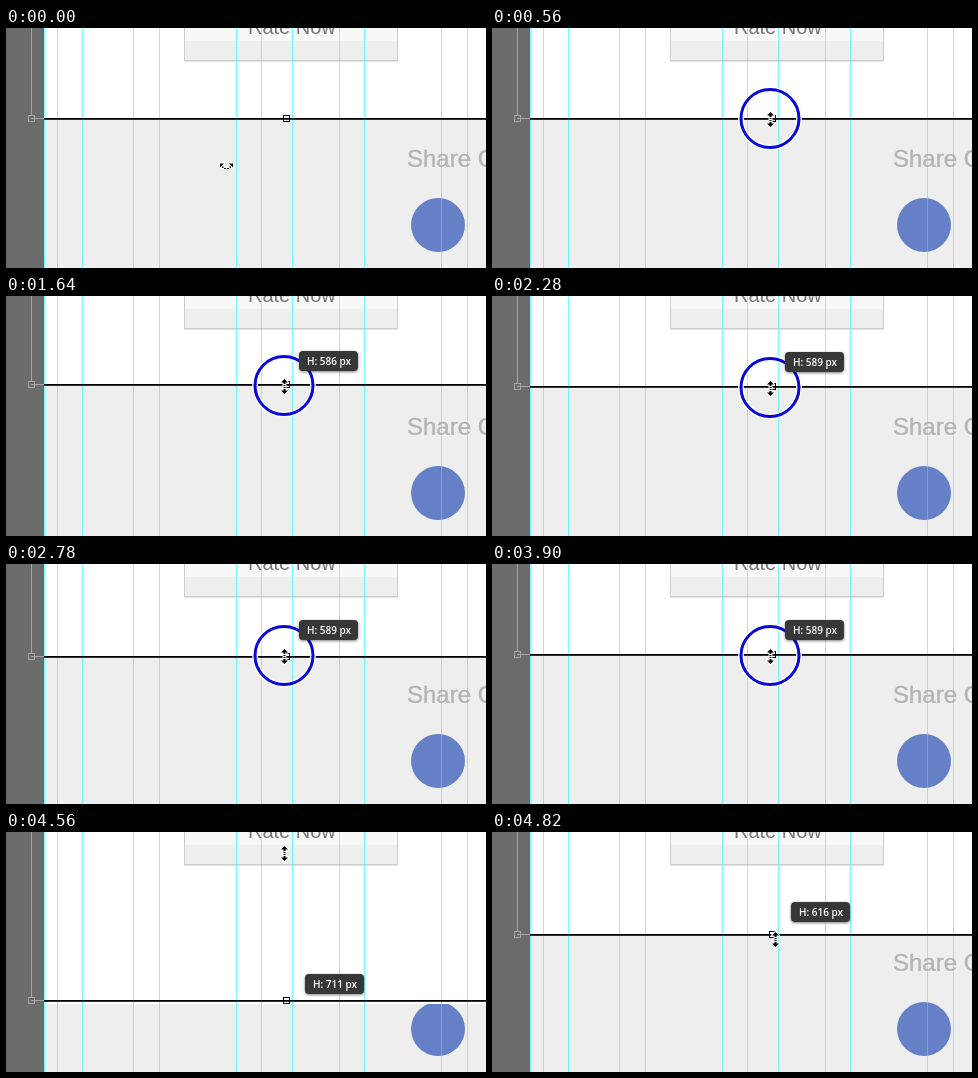
Recreate the animation shown at these times as an HTML page with a canvas. Size 480 by 240 pixels, loop 4.84 s.

```html
<!DOCTYPE html>
<html lang="en">
<head>
<meta charset="utf-8">
<title>Dragging a shape edge</title>
<style>
  html, body { margin: 0; width: 100%; height: 100%; overflow: hidden; background: #eee; }
  canvas { display: block; }
</style>
</head>
<body>
<canvas id="stage" width="480" height="240"></canvas>
<script>
const ctx = document.getElementById('stage').getContext('2d');
const LOOP = 4840, TICK = 20;
const PRESS = 560, TIP = 1280, SWING = 4250;

const clamp01 = v => Math.min(1, Math.max(0, v));
const ramp = (t, start, end) => clamp01((t - start) / (end - start));
const easeOut = (t, start, end) => 1 - (1 - ramp(t, start, end)) ** 3;
const mix = (a, b, u) => a + (b - a) * u;

// Careful dragging: two slow moves, then short nudges up and down.
const NUDGE = 3.5;
function gripY(t) {
  const nudge = start => NUDGE * easeOut(t, start, start + 100);
  return 91 - 5 * easeOut(t, 680, 1220) + 4 * easeOut(t, 1260, 1780)
    + nudge(1800) - nudge(1880) + nudge(2260) - nudge(2760) + nudge(3880);
}

// Wild dragging at the end: a sine swing that the pointer leads.
function swingY(t) {
  return mix(92, 122 + 99 * Math.sin((t - 4358) / 76), ramp(t, SWING, SWING + 150));
}

function edgeY(t) {
  if (t >= SWING) return Math.round(swingY(t));
  return 2 * Math.floor(gripY(t - TICK) / 2);
}

function pointerAt(t) {
  if (t >= SWING) {
    const lead = 156 * (1 - ramp(t, 4560, 4830));
    return [278 + 5 * ramp(t, 4600, 4760), swingY(t + lead) - 2].map(Math.round);
  }
  const away = 1 - easeOut(t, TICK, 380);
  return [278 - 58 * away, gripY(t) + 47 * away].map(Math.round);
}

function rect(color, x, y, w, h) {
  ctx.fillStyle = color;
  ctx.fillRect(x, y, w, h);
}

function text(str, x, y, font, color) {
  ctx.font = font;
  ctx.fillStyle = color;
  ctx.fillText(str, x, y);
}

function ring(x, y, r, width, color) {
  ctx.beginPath();
  ctx.arc(x, y, r, 0, 7);
  ctx.lineWidth = width;
  ctx.strokeStyle = color;
  ctx.stroke();
}

function handle(x, y, color) {
  ctx.lineWidth = 1;
  ctx.strokeStyle = color;
  ctx.strokeRect(x - 2.5, y - 2.5, 6, 6);
}

function drawGuides() {
  const guide = x => rect('rgba(0,255,255,.55)', Math.round(x), 0, 1, 240);
  [38, 51, 76, 286].forEach(guide);
  for (let left = 127.4; left < 480; left += 102.6) {
    guide(left);
    guide(left + 25.4);
  }
}

function drawPage(whiteBottom) {
  const shareFont = '24px "Liberation Sans", sans-serif';
  rect('#eee', 0, 0, 480, 240);
  text('Share O', 401, 140, shareFont, '#fff');
  text('Share O', 401, 139, shareFont, '#b4b4b4');
  ctx.lineWidth = .5;
  ctx.strokeStyle = '#b4b4b4';
  ctx.strokeText('Share O', 401, 139);
  ctx.beginPath();
  ctx.arc(432, 197, 27, 0, 7);
  ctx.fillStyle = '#6680c8';
  ctx.fill();

  rect('#fff', 38, 0, 442, whiteBottom);

  rect('#ccc', 178, 0, 214, 33);
  rect('#e4e4e4', 178, 33, 214, 1);
  rect('#f8f8f8', 179, 0, 212, 13);
  rect('#eee', 179, 13, 212, 19);
  text('Rate Now', 242, 6, '20px "Liberation Sans", sans-serif', '#777');

  drawGuides();
  rect('#6b6b6b', 0, 0, 38, 240);
}

function drawEdge(y) {
  rect('#a5a5a5', 25, 0, 1, y - 3);
  rect('#a5a5a5', 25, y, 13, 1);
  handle(25, y, '#a5a5a5');
  rect('#000', 38, y, 442, 1);
  rect('#333', 38, y + 1, 442, 1);
  handle(280, y, '#000');
}

function drawTip(x, y, value) {
  ctx.save();
  ctx.shadowColor = 'rgba(0,0,0,.5)';
  ctx.shadowBlur = 3;
  ctx.shadowOffsetY = 1;
  ctx.beginPath();
  ctx.roundRect(x, y, 59, 20, 4);
  ctx.fillStyle = '#373737';
  ctx.fill();
  ctx.restore();
  text(`H: ${value} px`, x + 8, y + 13.5, '600 10px "Open Sans", sans-serif', '#fff');
}

const ROTATE_HALF = new Path2D('M-6.5-3H-2.5L-6.5 1ZM-4.5 0H-3V1.5H-4.5ZM-2.5 1.5H-.5V2.5H-2.5Z');
const RESIZE_HALF = new Path2D('M0-7.5L3.5-4H1V-2.5H-1V-4H-3.5ZM-1-1.5H1V-.5H-1Z');

// Each pointer is one half plus its mirror image, black on a white outline.
function drawPointer(x, y, half, mirrorX, mirrorY) {
  ctx.save();
  ctx.translate(x + .5, y + .5);
  const shape = new Path2D(half);
  shape.addPath(half, new DOMMatrix([mirrorX, 0, 0, mirrorY, 0, 0]));
  ctx.lineJoin = 'round';
  ctx.lineWidth = 2;
  ctx.strokeStyle = '#fff';
  ctx.stroke(shape);
  ctx.fillStyle = '#000';
  ctx.fill(shape);
  ctx.restore();
}

function draw(t) {
  const edge = edgeY(t);
  const [x, y] = pointerAt(t);
  const swinging = t >= SWING;

  const whiteBottom = swinging ? Math.max(edge, Math.round(swingY(t - 3))) : edge;
  drawPage(whiteBottom + 1);
  drawEdge(edge);
  if (t >= PRESS && !swinging) {
    ring(278, y - .5, 29, 6, 'rgba(255,255,255,.85)');
    ring(278, y - .5, 29, 3, '#0808d8');
  }
  if (swinging) {
    const moved = edge - 102;
    drawTip(299, Math.round(70 + moved * 1.09), Math.round(616 + moved * 1.44));
  } else if (t >= TIP) {
    drawTip(293, Math.round(10 + y / 2), Math.round(586 + (y - 90) * 1.5));
  }
  if (t < 340) drawPointer(x, y, ROTATE_HALF, -1, 1);
  else drawPointer(x, y, RESIZE_HALF, 1, -1);
}

function frame() {
  const t = performance.now() % LOOP;
  draw(t - t % TICK);
  requestAnimationFrame(frame);
}
frame();
</script>
</body>
</html>
```
